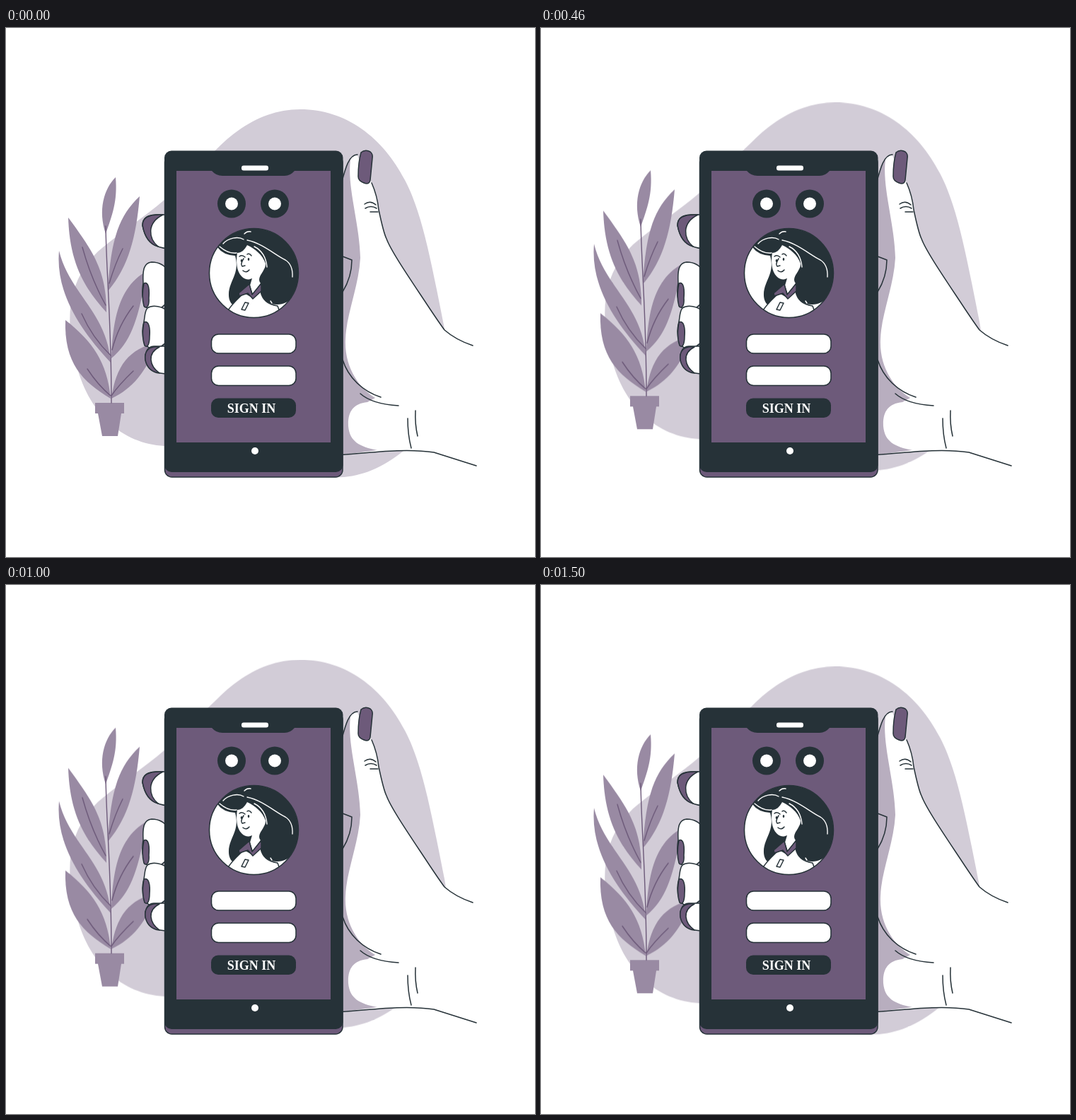
An HTML page without scripts that plays this animation: 748 px wide and 748 px high, repeating every 1.54 s.

```html
<!DOCTYPE html>
<html lang="en">
<head>
<meta charset="utf-8">
<title>Sign in</title>
<style>
  :root { --ink: #263238; --plum: #6d5a7a; --mauve: #998aa3; --mist: #d2ccd7; --shade: #b8aebf; }
  html, body { margin: 0; width: 100%; height: 100%; overflow: hidden; background: #fff; }
  svg { display: block; width: 100vw; height: 100vh; }
  .ink { fill: var(--ink); }
  .plum { fill: var(--plum); }
  .mauve { fill: var(--mauve); }
  .mist { fill: var(--mist); }
  .shade { fill: var(--shade); }
  .white { fill: #fff; }
  .line { stroke: var(--ink); stroke-width: 1.5; stroke-linecap: round; stroke-linejoin: round; }
  .open { fill: none; }
  .vein { fill: none; stroke: var(--plum); stroke-width: 1.4; stroke-linecap: round; }
  .shine { fill: none; stroke: #fff; stroke-width: 1.4; stroke-linecap: round; }
  text { font: bold 18px "Liberation Serif", "Times New Roman", serif; text-anchor: middle; fill: #fff; }

  /* 37 ticks per loop: 17 up, 19 down, then wrap */
  .float { animation: float 1540ms -4ms infinite; }
  @keyframes float {
    0% { transform: translateY(0); animation-timing-function: steps(17); }
    45.946% { transform: translateY(-15px); animation-timing-function: steps(19); }
    97.297% { transform: translateY(.3px); animation-timing-function: steps(1); }
    100% { transform: translateY(0); }
  }
</style>
</head>
<body>
<svg viewBox="0 0 748 748">
  <defs>
    <clipPath id="portrait"><circle cx="350.5" cy="346.5" r="63"/></clipPath>
  </defs>

  <g class="float">
    <path class="mist" d="M416 115C481 115 533 155 564 215C589 262 602 335 620 425C634 500 612 565 562 598C535 620 508 632 478 635C400 640 320 597 224 591C165 588 115 545 98 470C82 405 90 355 130 316C160 290 195 268 224 243C250 222 272 195 296 173C330 138 370 115 416 115Z"/>
    <g class="mauve">
      <path d="M155 211C138 228 130 258 141 291C150 265 158 245 155 211Z"/>
      <path d="M189 238C160 265 148 298 144 372C173 338 184 296 189 238Z"/>
      <path d="M88 268C90 332 110 367 142 402C142 345 125 318 88 268Z"/>
      <path d="M75 315C70 372 102 424 148 473C143 402 90 376 75 315Z"/>
      <path d="M200 343C164 363 151 402 149 467C182 440 188 400 200 343Z"/>
      <path d="M84 413C82 474 108 500 148 524C143 472 122 443 84 413Z"/>
      <path d="M214 445C174 453 155 478 149 524C180 509 198 486 214 445Z"/>
      <path d="M126 530H167V545H163L158 577H136L130 545H126Z"/>
    </g>
    <g class="vein">
      <path d="M141 280C142 350 149 415 149 530"/>
      <path d="M165 312Q154 334 146 361M108 310Q120 354 141 392M107 404Q122 438 148 463M180 393Q159 420 150 455M115 482Q130 505 148 520M180 485Q159 505 149 520"/>
    </g>
  </g>

  <!-- Hand -->
  <path class="white" d="M470 235C478 208 482 182 496 179L517 219Q525 237 527 257C531 276 534 290 538 298C545 317 575 360 600 398Q612 416 620 427Q636 441 660 449H748V630L665 619L605 600C565 594 520 600 470 604Z"/>
  <path class="shade" d="M470 235C477 211 481 193 487 186C482 225 500 276 501 325C499 365 481 405 480 440C478 480 500 510 522 523L511 529C490 531 483 544 484 563C486 585 500 592 525 597L470 604Z"/>
  <g class="line open">
    <path d="M470 235C478 208 482 179 497 179M517 219Q525 237 527 257C531 276 534 290 538 298C545 317 575 360 600 398Q612 416 620 427Q636 441 660 449"/>
    <path d="M470 604C520 600 565 594 605 600L665 619"/>
    <path d="M476 323L489 328C489 347 484 360 476 373M476 469C484 495 505 514 530 522M501 517Q518 532 555 534"/>
    <path d="M568 552Q568 575 573 594M579 541Q578 560 582 577"/>
    <path d="M507 249Q515 243 523 250M508 255Q516 250 524 255M515 260H526"/>
  </g>
  <path class="plum line" d="M502 176Q508 171 515 175Q519 178 518 184L515 215Q514 222 506 219Q498 216 498 210Q498 190 502 176Z"/>

  <!-- Fingers -->
  <g class="line white">
    <path d="M230 264H216C200 263 193 269 193 279C197 301 210 311 230 312Z"/>
    <path d="M230 345C224 334 214 331 206 331C195 332 193 342 194 360C191 378 194 396 204 398C214 401 222 396 230 385Z"/>
    <path d="M230 402C222 393 207 391 200 396C195 402 197 410 194 420C191 436 196 453 207 453C217 453 224 449 230 440Z"/>
    <path d="M230 450H209C199 450 195 462 198 472C203 484 212 489 230 489Z"/>
  </g>
  <g class="line plum">
    <path d="M222 264C200 263 193 269 193 279C196 296 204 306 215 309C202 298 198 276 222 264Z"/>
    <path d="M195 361C202 358 203 370 202 382C203 394 198 398 195 393C192 382 193 371 195 361Z"/>
    <path d="M195 416C202 413 204 424 203 436C203 447 200 453 196 449C192 438 193 427 195 416Z"/>
    <path d="M217 451C203 449 195 456 197 470C200 482 207 487 217 488C203 478 199 460 217 451Z"/>
  </g>

  <!-- Phone -->
  <rect class="plum line" x="224.5" y="180" width="251.5" height="455" rx="10"/>
  <rect class="ink" x="224" y="173.5" width="252.5" height="454.5" rx="10"/>
  <path class="plum" d="M241 202H291Q297 209 306 209H394Q402 209 408 202H459V586H241Z"/>
  <rect class="white" x="333" y="194.5" width="38" height="7" rx="3"/>
  <circle class="white" cx="352" cy="598" r="5"/>

  <g class="ink"><circle cx="319" cy="248.5" r="20"/><circle cx="380" cy="248.5" r="20"/></g>
  <g class="white"><circle cx="319" cy="248.5" r="9"/><circle cx="380" cy="248.5" r="9"/></g>

  <!-- Portrait -->
  <g clip-path="url(#portrait)">
    <path class="white" d="M285 280H415V412H285Z"/>
    <path class="ink" d="M297 309C310 292 325 280 350 280H420V360C411 372 409 382 396 388C385 394 367 391 361 379C356 385 325 380 322 392C314 388 313 374 318 362C323 349 329 340 324 322Q307 321 299 310Z"/>
    <path class="white" d="M327 318C325 330 326 344 333 351C339 357 344 356 348 354L345 364L349 376L360 361C353 352 368 343 367 333C363 321 352 312 341 307C337 314 333 318 327 318Z"/>
    <path class="white line" d="M312 402C320 389 329 382 337 374L349 381L360 372C362 383 370 391 384 393L392 415H310Z"/>
    <path class="plum line" d="M329 375L344 362L348 377L361 361L361 372L349 383L342 375L330 379Z"/>
    <path class="line open" d="M333 398L338 388L343 389L338 399ZM330 323Q334 320 338 324M341 320Q344 318 347 322M336 326Q331 334 334 337L338 336M335 343Q340 347 344 342"/>
    <g class="ink"><ellipse cx="333" cy="329" rx="1.3" ry="2"/><ellipse cx="343" cy="327" rx="1.3" ry="2"/></g>
    <path class="shine" d="M302 309C310 316 318 319 326 318M307 305C314 297 328 294 336 299M337 291Q341 287 346 288M341 300C362 304 382 322 395 328Q406 335 405 352M351 309Q367 317 369 338M374 386L376 389"/>
  </g>
  <circle class="line open" cx="350.5" cy="346.5" r="63"/>

  <g class="white line">
    <rect x="290.5" y="433" width="119.5" height="27" rx="10"/>
    <rect x="290.5" y="478" width="119.5" height="27.5" rx="10"/>
  </g>
  <rect class="ink" x="290" y="523.5" width="120" height="27.5" rx="10"/>
  <text x="347" y="543.5">SIGN IN</text>
</svg>
</body>
</html>
```
